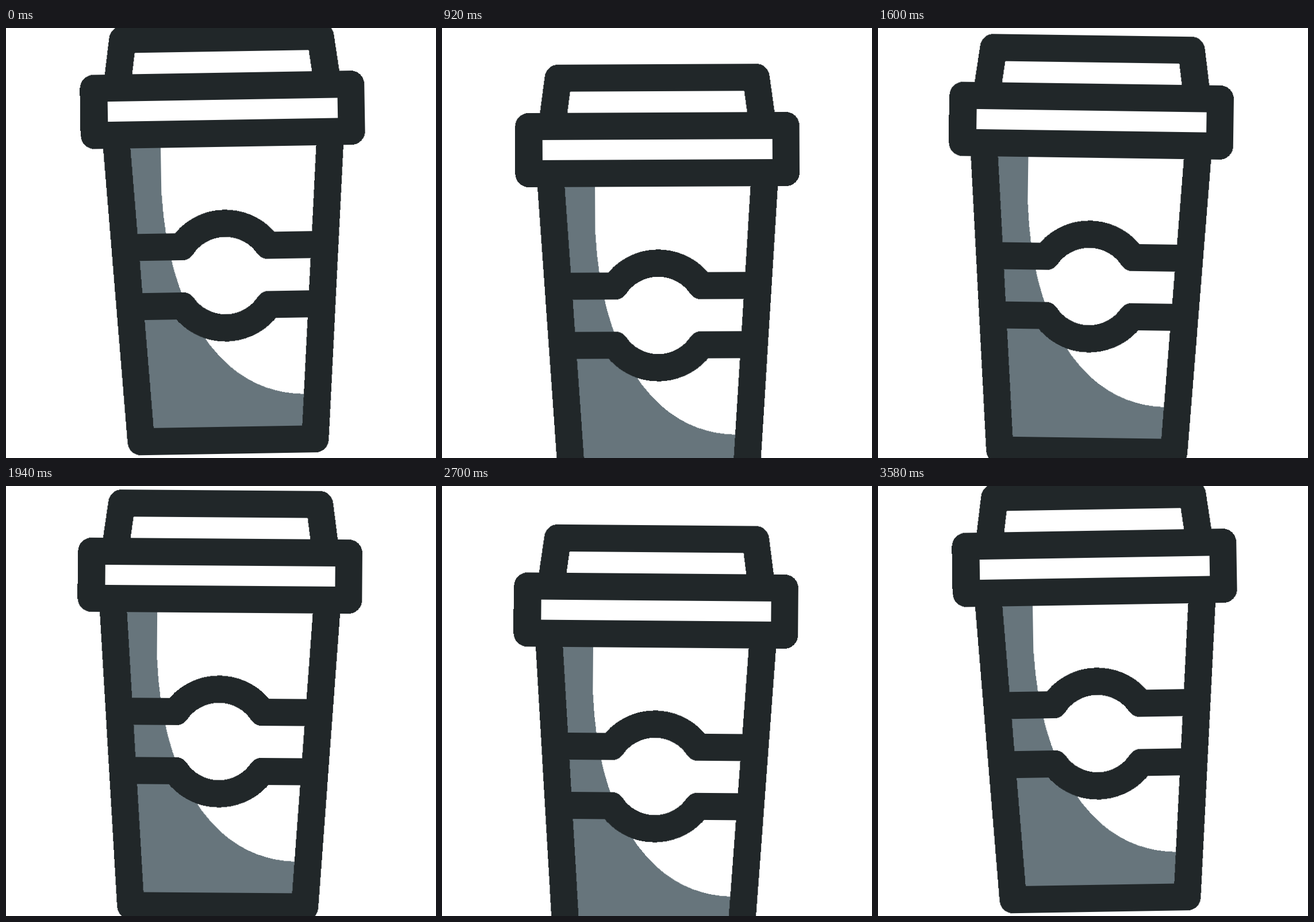
These frames come from a looping animation (748x748 px, 3.6 s). An HTML page:

```html
<!DOCTYPE html>
<html lang="en">
<head>
<meta charset="utf-8">
<title>Floating cup</title>
<style>
  html, body { margin: 0; width: 100%; height: 100%; overflow: hidden; background: #fff; }
  svg { display: block; width: 100%; height: 100%; shape-rendering: crispEdges; }
  .bob, .sway {
    animation: 3600ms cubic-bezier(.333, 0, .667, 1) infinite;
  }
  .bob { animation-name: bob; }
  .sway { animation-name: sway; transform-origin: 0 -32.5px; }
  .line { fill: none; stroke: #212729; stroke-width: 47.3; stroke-linejoin: round; }
  .shade { fill: #67757c; }

  @keyframes bob {
    0%, 49.86%, 99.44%, 100% { transform: translateY(0); }
    24.3%, 74.72% { transform: translateY(65.2px); }
  }
  /* The pivot is the top left corner, so the sway also lifts the cup. */
  @keyframes sway {
    0%, 32.22%, 64.3%, 98.9%, 100% { transform: rotate(-.95deg); }
    15.36%, 47.83%, 80.97% { transform: rotate(1.05deg); }
  }
</style>
</head>
<body>
<svg viewBox="0 0 748 748">
  <g class="bob">
    <g class="sway">
      <path class="shade" d="M188 200H264.7V260C264.7 477 354 645 512 645V724H222Z"/>
      <g class="line">
        <!-- lid -->
        <path d="M190.4 107.6L202 23.5H546L557.4 107.6"/>
        <rect x="150" y="107.7" width="447.4" height="81.7"/>
        <!-- body -->
        <path d="M187.1 189L222.6 723.7H525.4L560.9 189"/>
        <!-- sleeve -->
        <path d="M204 385.5H299A91 91 0 0 1 449 385.5H544"/>
        <path d="M211 488.5H299A91 91 0 0 0 449 488.5H537"/>
      </g>
    </g>
  </g>
</svg>
</body>
</html>
```
